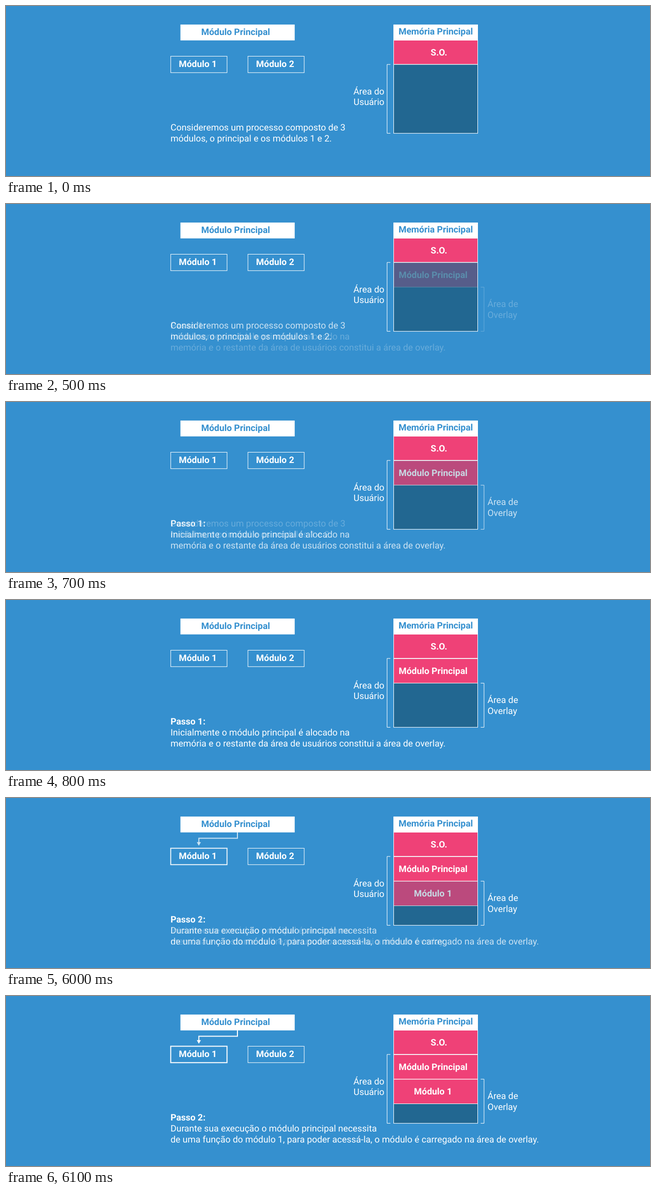
Write an HTML page with a canvas that moves like this. It is 1280x340 px and loops after 8 s.

```html
<!DOCTYPE html>
<html lang="pt-BR">
<head>
<meta charset="utf-8">
<title>Overlay</title>
<style>
html, body { margin: 0; width: 100%; height: 100%; overflow: hidden; background: #3590cf; }
canvas { display: block; }
</style>
</head>
<body>
<canvas id="stage" width="1280" height="340"></canvas>
<script>
const W = 1280, H = 340, LOOP = 8000;
const BLUE = '#3590cf', PINK = '#ef4177', DARK = '#226791', WHITE = '#fff';
const REGULAR = '17.93px Roboto, sans-serif';
const STRONG = 'bold 17.93px Roboto, sans-serif';
const LINE = 21.6;

const captions = [
  [null, 'Consideremos um processo composto de 3', 'módulos, o principal e os módulos 1 e 2.'],
  ['Passo 1:', 'Inicialmente o módulo principal é alocado na',
    'memória e o restante da área de usuários constitui a área de overlay.'],
  ['Passo 2:', 'Durante sua execução o módulo principal necessita',
    'de uma função do módulo 1, para poder acessá-la, o módulo é carregado na área de overlay.']
];

function drawScene(step) {
  const canvas = document.createElement('canvas');
  canvas.width = W;
  canvas.height = H;
  const c = canvas.getContext('2d');
  // Keeps glyph advances fractional
  c.textRendering = 'geometricPrecision';

  const text = (str, x, y, font = REGULAR, color = WHITE, align = 'left') => {
    c.font = font;
    c.fillStyle = color;
    c.textAlign = align;
    c.fillText(str, x, y);
  };
  const fill = (color, x1, y1, x2, y2) => {
    c.fillStyle = color;
    c.fillRect(x1, y1, x2 - x1, y2 - y1);
  };
  const outline = (x1, y1, x2, y2, width = 1) => {
    c.strokeStyle = WHITE;
    c.lineWidth = width;
    c.strokeRect(x1, y1, x2 - x1, y2 - y1);
  };
  const path = (width, ...points) => {
    c.beginPath();
    points.forEach(([x, y]) => c.lineTo(x, y));
    c.strokeStyle = WHITE;
    c.lineWidth = width;
    c.stroke();
  };
  const block = (color, y1, y2) => {
    fill(color, 770.5, y1, 937.5, y2);
    outline(770.5, y1, 937.5, y2);
  };

  fill(BLUE, 0, 0, W, H);

  // Module tree
  fill(WHITE, 346.7, 37.1, 573.8, 68.8);
  text('Módulo Principal', 388, 58.3, STRONG, BLUE);
  outline(327.4, 100.5, 439.3, 133.3, step === 2 ? 2 : 1);
  text('Módulo 1', 343.5, 122.4, STRONG);
  outline(480.9, 100.5, 592.7, 133.3);
  text('Módulo 2', 497.1, 122.4, STRONG);

  // Main memory
  block(PINK, 68.5, 116.6);
  block(DARK, 116.9, 254.6);
  fill(WHITE, 770, 37.1, 938, 68.6);
  text('Memória Principal', 780.2, 57.3, STRONG, BLUE);
  text('S.O.', 860.5, 98.6, STRONG, WHITE, 'center');
  path(1, [764, 116.9], [757.4, 116.9], [757.4, 254.6], [764, 254.6]);
  text('Área do', 752, 176.6, REGULAR, WHITE, 'right');
  text('Usuário', 752, 176.6 + LINE, REGULAR, WHITE, 'right');

  if (step >= 1) {
    block(PINK, 117.3, 166.2);
    text('Módulo Principal', 780.5, 148, STRONG);
    path(1, [943.5, 166.3], [950.1, 166.3], [950.1, 254.6], [943.5, 254.6]);
    text('Área de', 957, 206.2);
    text('Overlay', 957, 206.2 + LINE);
  }

  if (step === 2) {
    block(PINK, 166.6, 215.5);
    text('Módulo 1', 810.8, 197.2, STRONG);
    path(2, [460, 68.5], [460, 80.6], [383.3, 80.6], [383.3, 89]);
    c.beginPath();
    c.moveTo(379.2, 88.3);
    c.lineTo(387.4, 88.3);
    c.lineTo(383.3, 95.4);
    c.fillStyle = WHITE;
    c.fill();
  }

  // The heading, when present, takes the first caption line
  const [heading, ...lines] = captions[step];
  let y = 249.3;
  if (heading) {
    text(heading, 327, y, STRONG);
    y += LINE;
  }
  lines.forEach((line, i) => text(line, 327, y + i * LINE));
  return canvas;
}

const scenes = [0, 1, 2].map(drawScene);
const ctx = document.getElementById('stage').getContext('2d');

// Cross-fades advance in four steps of 100 ms
const fade = (t, start) => Math.min(4, Math.max(0, Math.floor((t - start) / 100) + 1)) / 4;

function render() {
  const t = performance.now() % LOOP;
  [1, fade(t, 500), fade(t, 5800)].forEach((alpha, i) => {
    ctx.globalAlpha = alpha;
    ctx.drawImage(scenes[i], 0, 0);
  });
  requestAnimationFrame(render);
}
render();
</script>
</body>
</html>
```
